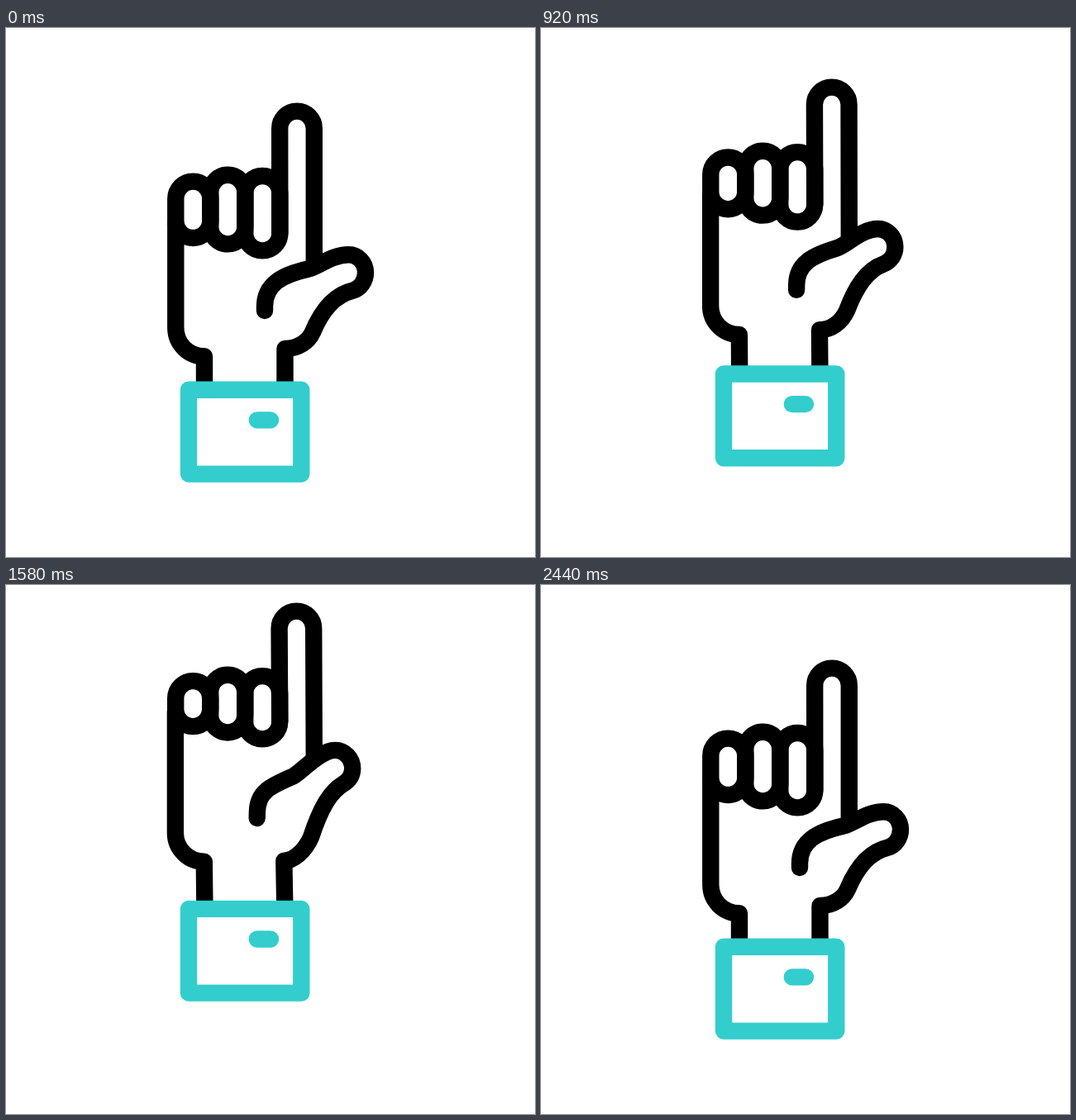
An HTML page that plays this animation: 640 by 640 pixels, repeating every 3.08 s.

```html
<!DOCTYPE html>
<html lang="en">
<head>
<meta charset="utf-8">
<title>Pointing hand</title>
<style>
  html, body { margin: 0; width: 100%; height: 100%; overflow: hidden; background: #fff; }
  svg { display: block; width: 100%; height: 100%; }
  path { fill: none; stroke-width: 20.4; stroke-linecap: round; stroke-linejoin: round; }
  #hand path { stroke: #000; }
  #cuff path { stroke: #33cdcd; }
</style>
</head>
<body>
<svg viewBox="0 0 640 640">
  <g id="hand"></g>
  <g id="cuff">
    <path d="M221 437.8H357.3V539.6H221Z"/>
    <path d="M303.8 474.4H320"/>
  </g>
</svg>
<script>
const LOOP = 3080;
const LIFT = -46;
// [time, pose]: 0 is resting, 1 is fully raised
const STEPS = [[203, 0], [665, 1], [1127, 0], [1590, 1], [2433, 0]];

const hand = document.getElementById('hand');
const cuff = document.getElementById('cuff');

const capsule = (x, top, bottom) =>
  `M${x} ${top}A21 21 0 0 1 ${x + 42} ${top}L${x + 42} ${bottom}A21 21 0 0 1 ${x} ${bottom}Z`;

// Each part is a pair of outlines: resting and raised
const parts = [
  [capsule(205.3, 206.6, 233), capsule(205.2, 137, 150)],
  [capsule(247.3, 198.8, 240.4), capsule(247.2, 129.6, 157.4)],
  [capsule(289.3, 200, 248.4), capsule(289.2, 131, 165.3)],
  // index finger
  ['M331.3 248.4L331.2 121.4A20.8 20.8 0 0 1 372.8 121.4L372.8 283',
   'M331.2 165.3L330.6 52.3A20.8 20.8 0 0 1 372.2 52.3L372.8 209'],
  // palm edge
  ['M205.3 236L205.3 362.6C205.3 382 220.5 397.3 240 397.3L240 434',
   'M204.9 153L204.9 300C204.9 319 220.3 334.6 239.8 334.6L240.4 388'],
  // thumb and right side of the wrist
  ['M313 342L313 337C313 310 334 298.5 366 291.5C379 288 395 274.2 414.5 274.2' +
   'C426 274.2 435 284 435 296C435 306 428.5 315 420 317.5' +
   'C396 323 381 344 371 368C366 379 354 388 337.5 388L337.5 434',
   'M303.7 282L303.9 275C304 250 320 243 348 231C358 225.5 380 199.8 398 199.8' +
   'C410 199.8 419.2 210 419.2 222C419.2 230 415 236.5 407.5 241' +
   'C391 251 380 272 369 305C361 323 347 333.7 336.3 333.7L337.3 388']
].map(([rest, raised]) => {
  const path = document.createElementNS('http://www.w3.org/2000/svg', 'path');
  hand.append(path);
  return { path, rest, ends: raised.match(/[\d.]+/g).map(Number) };
});

function poseAt(time) {
  for (let i = 1; i < STEPS.length; i++) {
    const [t0, a] = STEPS[i - 1], [t1, b] = STEPS[i];
    if (time >= t0 && time < t1) {
      const u = (time - t0) / (t1 - t0);
      return a + (b - a) * u * u * (3 - 2 * u);
    }
  }
  return 0;
}

function draw() {
  const pose = poseAt(performance.now() % LOOP);
  for (const { path, rest, ends } of parts) {
    let i = 0;
    path.setAttribute('d', rest.replace(/[\d.]+/g, n => +n + (ends[i++] - n) * pose));
  }
  cuff.setAttribute('transform', `translate(0 ${LIFT * pose})`);
  requestAnimationFrame(draw);
}
draw();
</script>
</body>
</html>
```
